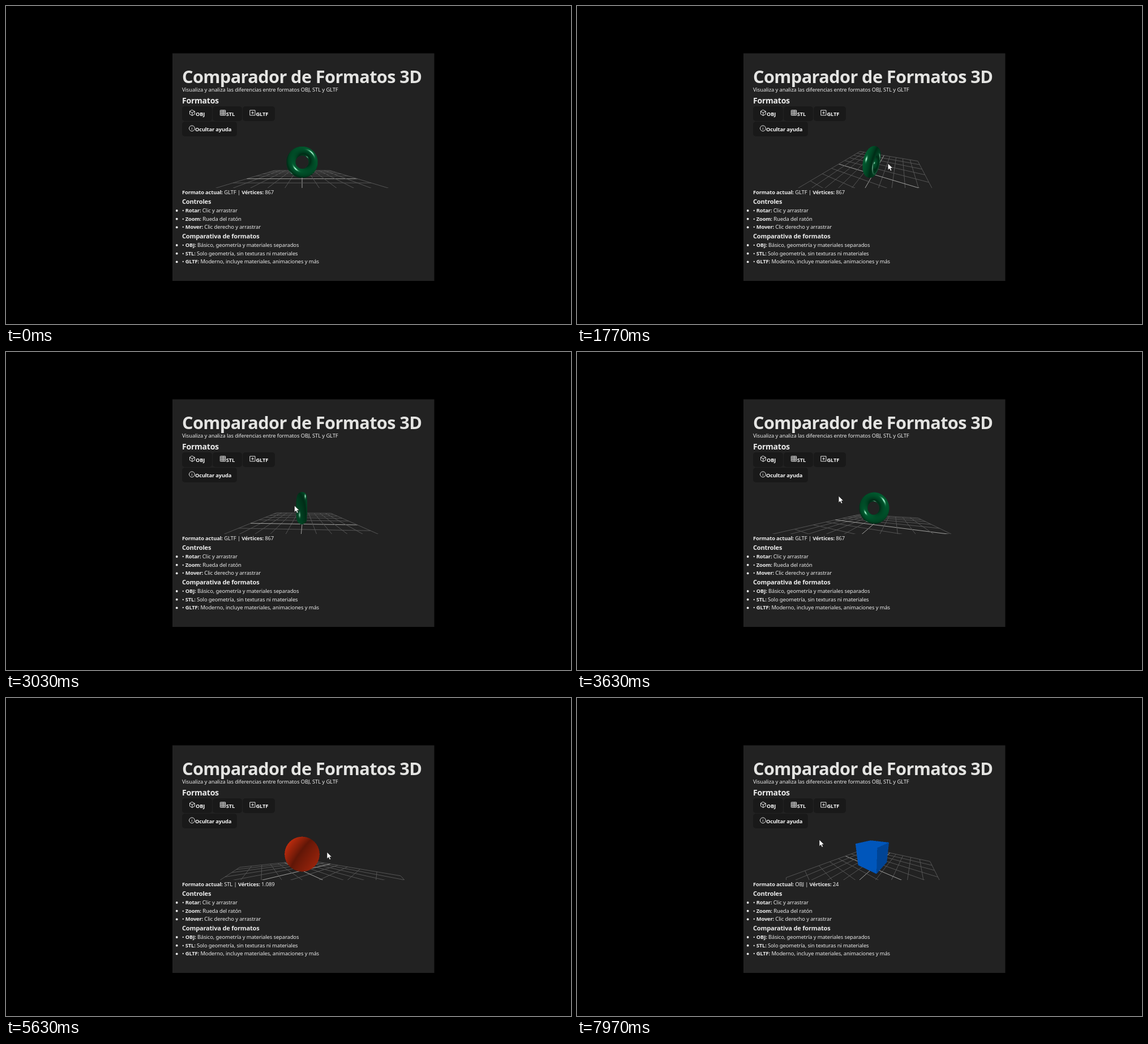
Write an HTML page with a canvas that moves like this. It is 998 px wide and 561 px high and loops after 8 s.

```html
<!DOCTYPE html>
<html lang="es">
<head>
<meta charset="utf-8">
<title>Comparador de Formatos 3D</title>
<style>
html, body { margin: 0; width: 100%; height: 100%; overflow: hidden; background: #000; }
svg, canvas { position: absolute; left: 0; top: 0; }
#view { left: 311px; top: 230px; }
text { font: 9.43px "Noto Sans", "Open Sans", sans-serif; letter-spacing: -.013em; fill: #ebebeb; white-space: pre; }
.b { font-weight: 700; letter-spacing: -.02em; }
.btn { font-weight: 600; font-size: 9.3px; letter-spacing: -.015em; fill: #f6f6f6; }
.h1 { font-size: 30.7px; fill: #e4e4e2; }
.h2 { font-size: 14.1px; }
.h3 { font-size: 11.1px; }
.icon { fill: none; stroke: #eee; stroke-width: 2; stroke-linecap: round; stroke-linejoin: round; }
</style>
</head>
<body>
<svg id="page" width="998" height="561">
  <rect x="294" y="83.5" width="462.5" height="401.5" fill="#222"/>
  <g fill="#191919">
    <rect x="311" y="177" width="53" height="26" rx="5"/>
    <rect x="365" y="177" width="52" height="26" rx="5"/>
    <rect x="418" y="177" width="57" height="26" rx="5"/>
    <rect x="311" y="204" width="97" height="26" rx="5"/>
  </g>
  <rect id="ring" y="177" height="26" rx="4.5" fill="none" stroke="#fff" stroke-width="1.5"/>
  <g class="icon">
    <path transform="translate(323 182.5) scale(.49)" d="M12 2 21 7V17L12 22 3 17V7ZM3.3 7 12 12 20.7 7M12 22V12"/>
    <path transform="translate(377.3 182.5) scale(.49)" d="M3 3H21V21H3ZM3 9H21M3 15H21M9 3V21M15 3V21"/>
    <path transform="translate(429.7 182.5) scale(.49)" d="M3 3H21V21H3ZM8 12H16M12 8V16"/>
    <path transform="translate(322.5 210) scale(.49)" d="M2 12A10 10 0 0 1 22 12A10 10 0 0 1 2 12M12 16V12M12 8H12.01"/>
  </g>
  <text class="b h1" x="311" y="136">Comparador de Formatos 3D</text>
  <text x="311" y="150.5">Visualiza y analiza las diferencias entre formatos OBJ, STL y GLTF</text>
  <text class="b h2" x="311" y="171.5">Formatos</text>
  <text class="btn" x="335" y="194.3">OBJ</text>
  <text class="btn" x="388.7" y="194.3">STL</text>
  <text class="btn" x="441.5" y="194.3">GLTF</text>
  <text class="btn" x="334" y="221.3">Ocultar ayuda</text>
  <text x="311" y="332"><tspan class="b">Formato actual:</tspan> <tspan id="format"></tspan> | <tspan class="b">Vértices:</tspan> <tspan id="count"></tspan></text>
  <text class="b h3" x="311" y="348.5">Controles</text>
  <text class="b h3" x="311" y="409.5">Comparativa de formatos</text>
</svg>
<canvas id="view" width="424" height="91"></canvas>
<svg width="998" height="561">
  <path id="cursor" d="M0 0V11.6L2.7 9.1 4.6 13.2 6.6 12.3 4.8 8.3H8.4Z" fill="#fff" stroke="#111" stroke-width=".6"/>
</svg>
<script>
const $ = id => document.getElementById(id);
const LOOP = 8000;

const rows = [
  [364, 'Rotar:', 'Clic y arrastrar'],
  [378.7, 'Zoom:', 'Rueda del ratón'],
  [393.4, 'Mover:', 'Clic derecho y arrastrar'],
  [425, 'OBJ:', 'Básico, geometría y materiales separados'],
  [439.7, 'STL:', 'Solo geometría, sin texturas ni materiales'],
  [454.4, 'GLTF:', 'Moderno, incluye materiales, animaciones y más'],
];
$('page').insertAdjacentHTML('beforeend', rows.map(([y, name, note]) =>
  `<circle cx="301.7" cy="${y - 3}" r="1.9" fill="#ebebeb"/>
   <text x="311" y="${y}">• <tspan class="b">${name}</tspan> ${note}</text>`).join(''));

// time, azimuth, elevation
const orbit = [
  [0, 0, 0], [700, 0, 0], [1230, 2.79, -.27], [2330, 1.1, 1.43], [3030, 4.75, .12],
  [3450, 6.65, .03], [5100, 6.65, .03], [5630, 8.8, .03], [7400, 8.8, .03], [7900, 8.46, .4],
];
// time, x, y
const pointer = [
  [300, 650, 300], [650, 589, 270], [700, 589, 270], [1230, 549, 266], [2330, 549.5, 290],
  [3030, 509.5, 271], [3450, 482, 272], [4050, 391, 190], [4250, 391, 190], [4630, 428, 216],
  [5100, 597, 272], [5630, 567, 272], [5900, 567, 272], [6600, 338, 190], [6800, 338, 190],
  [7350, 423, 245], [7400, 423, 245], [7900, 428, 250],
];

function sample(track, t) {
  const i = track.findIndex(k => k[0] > t);
  if (i < 0) return track.at(-1).slice(1);
  if (i === 0) return track[0].slice(1);
  const a = track[i - 1], b = track[i];
  const u = (t - a[0]) / (b[0] - a[0]), s = u * u * (3 - 2 * u);
  return [1, 2].map(j => a[j] + (b[j] - a[j]) * s);
}

const { sqrt, max, min, abs, sin, cos } = Math;
const len = (x, y, z = 0) => sqrt(x * x + y * y + z * z);
const dot = (a, b) => a[0] * b[0] + a[1] * b[1] + a[2] * b[2];
const unit = v => { const l = len(...v); return v.map(c => c / l); };

const models = {
  GLTF: { count: '867', color: [0, 112, 58], gloss: 1,
    dist: (x, y, z) => len(len(x, y) - 1, z) - .4 },
  STL: { count: '1.089', color: [250, 58, 18], gloss: 0,
    dist: (x, y, z) => len(x, y, z) - 1.5 },
  OBJ: { count: '24', color: [0, 128, 280], gloss: 0,
    dist(x, y, z) {
      const a = abs(x) - 1, b = abs(y) - 1, c = abs(z) - 1;
      return len(max(a, 0), max(b, 0), max(c, 0)) + min(max(a, b, c), 0);
    } },
};

const W = 424, H = 91, DIST = 5, FOCAL = H / 2 / Math.tan(25 * Math.PI / 180);
const KEY = unit([1, 1, 1]), FILL = KEY.map(c => -c);
const ctx = $('view').getContext('2d');

function camera(az, el) {
  const back = [sin(az) * cos(el), sin(el), cos(az) * cos(el)];
  return {
    back, eye: back.map(c => c * DIST),
    right: [cos(az), 0, -sin(az)],
    up: [-sin(az) * sin(el), cos(el), -cos(az) * sin(el)],
  };
}

function drawLine(cam, a, b, color) {
  let [p, q] = [a, b].map(v => [dot(v, cam.right), dot(v, cam.up), DIST - dot(v, cam.back)]);
  const near = .1;
  if (p[2] < near && q[2] < near) return;
  if (p[2] > q[2]) [p, q] = [q, p];
  if (p[2] < near) {
    const u = (near - p[2]) / (q[2] - p[2]);
    p = p.map((c, i) => c + (q[i] - c) * u);
  }
  ctx.strokeStyle = color;
  ctx.beginPath();
  for (const [x, y, z] of [p, q]) ctx.lineTo(W / 2 + x / z * FOCAL, H / 2 - y / z * FOCAL);
  ctx.stroke();
}

function drawGrid(cam) {
  for (let i = -5; i <= 5; i++) {
    const color = i ? '#555' : '#a4a4a2';
    drawLine(cam, [i, -1.5, -5], [i, -1.5, 5], color);
    drawLine(cam, [-5, -1.5, i], [5, -1.5, i], color);
  }
}

const SIDE = 80, SS = 2, N = SIDE * SS;
const buffer = document.createElement('canvas');
buffer.width = buffer.height = N;
const bctx = buffer.getContext('2d');
const image = bctx.createImageData(N, N);

function shade(model, p, ray) {
  const { dist, color, gloss } = model, [x, y, z] = p, e = .002;
  const n = unit([
    dist(x + e, y, z) - dist(x - e, y, z),
    dist(x, y + e, z) - dist(x, y - e, z),
    dist(x, y, z + e) - dist(x, y, z - e),
  ]);
  const light = .12 + .5 * max(dot(n, KEY), 0) + .22 * max(dot(n, FILL), 0);
  const shine = dir => max(dot(n, unit(dir.map((c, i) => c - ray[i]))), 0) ** 90;
  const spec = gloss && 190 * shine(KEY) + 130 * shine(FILL);
  return color.map(c => c * light ** .45 + spec);
}

function drawModel(cam, model) {
  const { eye, right, up, back } = cam, px = image.data;
  px.fill(0);
  for (let j = 0, o = 0; j < N; j++) for (let i = 0; i < N; i++, o += 4) {
    const sx = ((i + .5) / SS - SIDE / 2) / FOCAL, sy = (SIDE / 2 - (j + .5) / SS) / FOCAL;
    const ray = unit([0, 1, 2].map(k => right[k] * sx + up[k] * sy - back[k]));
    const along = -dot(eye, ray), miss = DIST * DIST - along * along;
    if (miss > 3.05) continue;
    const half = sqrt(3.05 - miss), far = along + half;
    for (let t = along - half, n = 0; t < far && n < 50; n++) {
      const p = [eye[0] + ray[0] * t, eye[1] + ray[1] * t, eye[2] + ray[2] * t];
      const d = model.dist(...p);
      if (d < .004) {
        const c = shade(model, p, ray);
        px[o] = c[0]; px[o + 1] = c[1]; px[o + 2] = c[2]; px[o + 3] = 255;
        break;
      }
      t += d;
    }
  }
  bctx.putImageData(image, 0, 0);
  ctx.drawImage(buffer, (W - SIDE) / 2, (H - SIDE) / 2, SIDE, SIDE);
}

function setRing(t) {
  const stl = t >= 4200 && t < 5100, obj = t >= 6750 && t < 7400;
  $('ring').style.display = stl || obj ? '' : 'none';
  $('ring').setAttribute('x', stl ? 365.5 : 311.5);
  $('ring').setAttribute('width', stl ? 50.5 : 52);
}

function render(t) {
  const name = t < 4200 ? 'GLTF' : t < 6750 ? 'STL' : 'OBJ';
  const cam = camera(...sample(orbit, t));
  ctx.clearRect(0, 0, W, H);
  drawGrid(cam);
  drawModel(cam, models[name]);
  $('format').textContent = name;
  $('count').textContent = models[name].count;
  setRing(t);
  const [x, y] = sample(pointer, t);
  $('cursor').style.display = t < pointer[0][0] ? 'none' : '';
  $('cursor').setAttribute('transform', `translate(${x} ${y})`);
}

const start = performance.now();
function frame() {
  render((performance.now() - start) % LOOP);
  requestAnimationFrame(frame);
}
frame();
</script>
</body>
</html>
```
